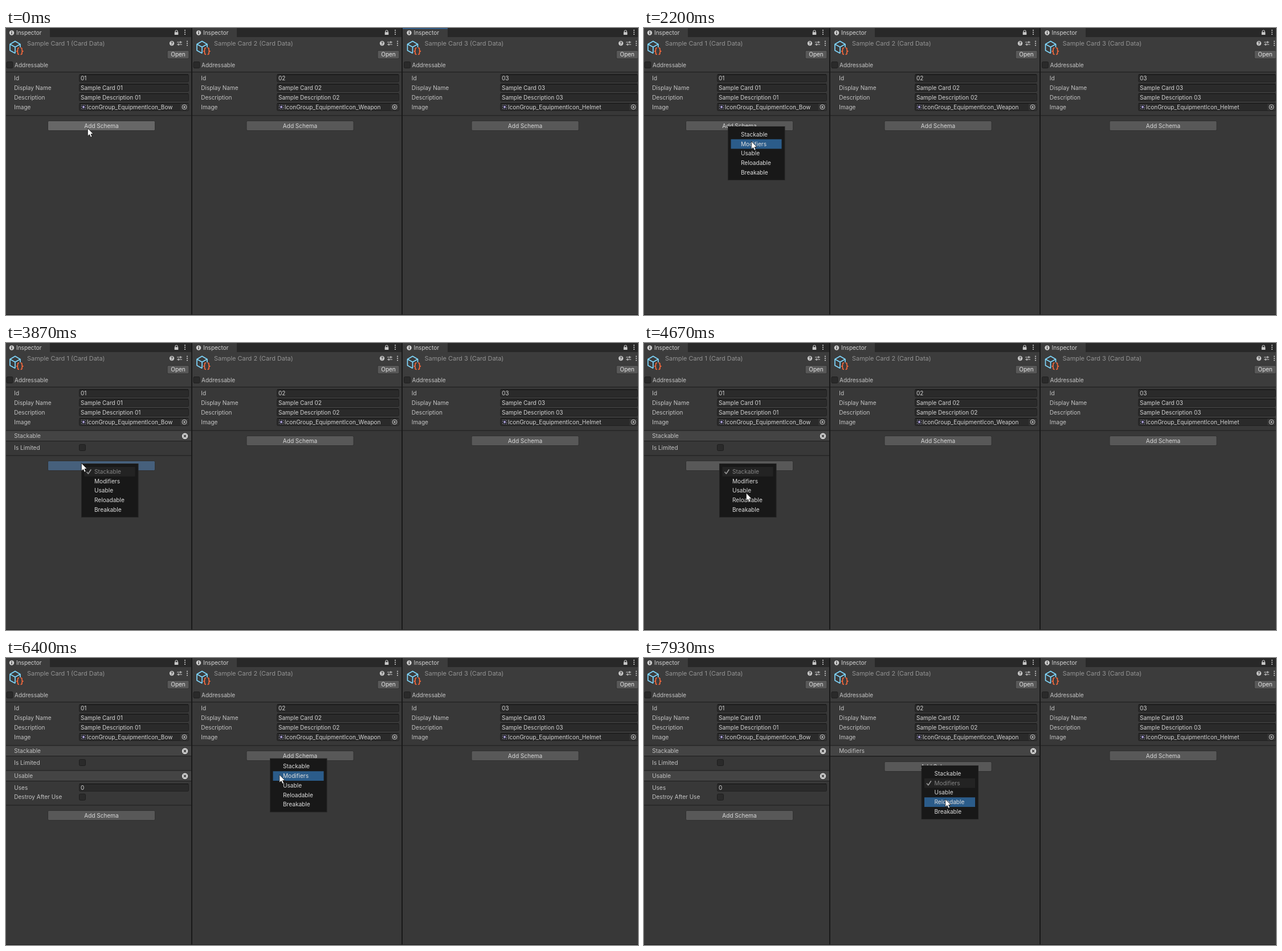
These frames come from a looping animation (1109 by 505 pixels, 8 s). An HTML page:

```html
<!DOCTYPE html>
<html lang="en">
<head>
<meta charset="utf-8">
<title>Card schemas</title>
<style>
html, body { margin: 0; width: 100%; height: 100%; overflow: hidden; background: #383838; }
svg { display: block; }
text { font-family: Inter, Roboto, sans-serif; white-space: pre; }
</style>
</head>
<body>
<svg id="stage" width="1109" height="505" viewBox="0 0 1109 505"></svg>
<script>
const LOOP = 8000, STEP = 1000 / 15;
const ITEMS = ['Stackable', 'Modifiers', 'Usable', 'Reloadable', 'Breakable'];
const ROW = 16.75, FONT = 10.03;

// x: content offset, left/right: panel edges, field: left edge of the inputs
const panels = [
  { n: 1, x: 0, left: 0, right: 325, tab: 77, field: 128, button: 73, image: 'Bow' },
  { n: 2, x: 328, left: 327, right: 694, tab: 405, field: 475, button: 421.5, image: 'Weapon' },
  { n: 3, x: 697.5, left: 696, right: 1113, tab: 775, field: 867, button: 816.5, image: 'Helmet' },
];

// Pointer moves: first step, last step, destination
const moves = [
  [9, 11, 147, 174], [13, 14, 147, 173], [26, 33, 188, 199], [36, 38, 187, 192],
  [39, 40, 186, 190], [45, 55, 132, 211], [58, 65, 178, 266], [69, 71, 180, 261],
  [75, 78, 198.5, 243.5], [78, 87, 463, 177], [90, 96, 479.5, 205], [105, 110, 487, 188],
  [113, 119, 528.5, 248],
];

const menus = [
  { from: 21, to: 43, x: 147, y: 173, panel: 1, pressed: 2 },
  { from: 58, to: 73, x: 132, y: 212, panel: 1, pressed: 2, checked: 0, blink: 70 },
  { from: 88, to: 104, x: 463, y: 176.5, panel: 2, pressed: 0, blink: 101 },
  { from: 112, to: 120, x: 486.5, y: 189, panel: 2, pressed: 2, checked: 1 },
];

const focusSpans = [[0, 21, 3], [43, 58, 1], [73, 89, 1], [104, 112, 2]];

const rect = (x, y, w, h, fill, more = '') =>
  `<rect x="${x}" y="${y}" width="${w}" height="${h}" fill="${fill}" ${more}/>`;
const box = (x, y, w, h, fill, line, r = 2) =>
  rect(x + .5, y + .5, w - 1, h - 1, fill, `stroke="${line}" rx="${r}"`);
const path = (d, stroke, w = 1, fill = 'none') =>
  `<path d="${d}" stroke="${stroke}" stroke-width="${w}" fill="${fill}" stroke-linejoin="round"/>`;
const dot = (x, y, r, fill, more = '') => `<circle cx="${x}" cy="${y}" r="${r}" fill="${fill}" ${more}/>`;
const at = (x, y, body) => `<g transform="translate(${x} ${y})">${body}</g>`;
// y is the middle of the capital letters
const text = (s, x, y, fill = '#c4c4c4', size = FONT, more = '') =>
  `<text x="${x}" y="${y + size * .364}" font-size="${size}" fill="${fill}" ${more}>${s}</text>`;

const dots = (x, y) => [-3.5, 0, 3.5].map(d => dot(x, y + d, 1.1, '#c8c8c8')).join('');
const info = (x, y) => dot(x, y, 4.2, '#d0d0d0') + rect(x - .7, y - 1, 1.4, 3.5, '#333') + dot(x, y - 2.3, .8, '#333');
const lock = (x, y) => rect(x - 3.3, y - .8, 6.6, 4.8, '#c8c8c8', 'rx=".5"') +
  path(`M${x - 2} ${y}v-2a2 2 0 0 1 4 0v2`, '#c8c8c8', 1.2);
const help = (x, y) => dot(x, y, 4.2, '#c8c8c8') + text('?', x, y, '#383838', 7.5, 'text-anchor="middle" font-weight="700"');
const sliders = (x, y) => path(`M${x - 4.5} ${y - 2}h9M${x - 4.5} ${y + 2}h9M${x + 1.7} ${y - 4}v4M${x - 1.7} ${y}v4`, '#c8c8c8', 1.2);
const cube = (x, y) => at(x, y,
  path('M10 22.5L1 17.5V6.5L10 1.2L19 6.5V12M1 6.5L10 11.5L19 6.5M10 11.5V22.5', '#7fd6fd', 1.7) +
  path('M17 13.2h-.8q-1.6 0-1.6 1.8v1.7q0 1.9-1.9 2.1q1.9 .2 1.9 2.1v1.7q0 1.8 1.6 1.8h.8' +
    'M19.6 13.2h.8q1.6 0 1.6 1.8v1.7q0 1.9 1.9 2.1q-1.9 .2-1.9 2.1v1.7q0 1.8-1.6 1.8h-.8', '#f4683c', 1.7));
const spriteIcon = (x, y) => rect(x - 4, y - 4, 8, 8, '#20202a') +
  path(`M${x - 3.5} ${y - 3.5}h7v7h-7z`, '#9a9aa4', '1" stroke-dasharray="1.6 1.9') + dot(x, y, 1.9, '#b4a8e0');
const target = (x, y) => dot(x, y, 4, 'none', 'stroke="#c4c4c4"') + dot(x, y, 1.6, '#c4c4c4');
const closeIcon = (x, y) => dot(x, y, 5.2, '#d4d4d4') +
  path(`M${x - 2.2} ${y - 2.2}l4.4 4.4m0-4.4l-4.4 4.4`, '#383838', 1.4);
const check = (x, y) => box(x, y - 6, 12, 12, '#2a2a2a', '#1e1e1e');

function input(p, y, value) {
  const w = p.right - 4 - p.field;
  return box(p.field, y - 7, w, 14, '#2a2a2a', '#212121') +
    rect(p.field + 1, y - 7, w - 2, 1, '#121212') + text(value, p.field + 3, y, '#d2d2d2');
}

function button(x, y, w, label, fill = '#585858') {
  return box(x, y - 9, w, 18, fill, '#303030') +
    text(label, x + w / 2, y, '#d8d8d8', FONT, 'text-anchor="middle"');
}

const line = (p, y) => rect(p.left, y - .5, p.right - p.left, 1, '#1c1c1c');

function header(p, focused) {
  const { x, left, right: r } = p, w = r - left;
  return rect(left, 0, w, 17, '#282828') + rect(left, 16, w, 61, '#3c3c3c') +
    rect(left, 0, p.tab - left, 17, '#3c3c3c') + (focused ? rect(left, 0, p.tab - left, 1.5, '#2d6299') : '') +
    info(x + 10, 8.5) + text('Inspector', x + 18, 8.5, '#d2d2d2') + lock(r - 26, 8) + dots(r - 11, 7.5) +
    cube(x + 6, 22) + text(`Sample Card ${p.n} (Card Data)`, x + 37, 27, '#939393', 10.95) +
    help(r - 34, 27) + sliders(r - 20.5, 27) + dots(r - 7, 27) +
    box(r - 42.5, 39, 39, 15.5, '#585858', '#303030') + text('Open', r - 23, 46.8, '#e4e4e4', FONT, 'text-anchor="middle"') +
    check(x + .5, 65) + text('Addressable', x + 15, 65) + line(p, 77.5);
}

function fields(p) {
  const label = p.x + 14.3, r = p.right;
  const rows = [['Id', '0' + p.n], ['Display Name', 'Sample Card 0' + p.n], ['Description', 'Sample Description 0' + p.n]];
  return rows.map(([name, value], i) => {
    const y = 88.5 + i * ROW;
    return text(name, label, y) + input(p, y, value);
  }).join('') +
    text('Image', label, 139) + input(p, 139, '') + spriteIcon(p.field + 8, 139) +
    text('IconGroup_EquipmentIcon_' + p.image, p.field + 13.8, 139, '#d2d2d2') +
    rect(r - 19, 133, 14, 12, '#343434') + target(r - 12, 139);
}

const schemaRows = { Stackable: [['Is Limited']], Usable: [['Uses', '0'], ['Destroy After Use']], Modifiers: [] };

function schemas(p, names, fill) {
  let y = 154, out = '';
  for (const name of names) {
    const rows = schemaRows[name];
    out += rect(p.left, y, p.right - p.left, 18.5, '#444') + line(p, y) + line(p, y + 18.5) +
      text(name, p.x + 14.3, y + 9.7) + closeIcon(p.right - 11, y + 9.7);
    rows.forEach(([label, value], i) => {
      const mid = y + 30 + i * ROW;
      out += text(label, p.x + 14.3, mid) + (value ? input(p, mid, value) : check(p.field, mid));
    });
    y += rows.length ? 28.2 + rows.length * ROW : 19;
    y = Math.floor(y);
  }
  return out + line(p, y) + button(p.button, y + 18, 189, 'Add Schema', fill);
}

function menu(m, f, [cx, cy]) {
  const hot = f === m.blink ? -1 : Math.floor((cy - m.y - 6) / ROW);
  return box(m.x, m.y, 100.5, 95, '#181818', '#242424', 0) + ITEMS.map((name, i) => {
    const y = m.y + 6 + i * ROW, mid = y + ROW / 2 - .2, off = i === m.checked;
    const fill = off ? '#232323' : i === hot ? '#2b5c8a' : '';
    return (fill ? rect(m.x + 5.5, y, 89, ROW, fill) : '') +
      (off ? path(`M${m.x + 9.5} ${mid + .5}l2.8 3.3l5-7.5`, '#9a9a9a', 1.6) : '') +
      text(name, m.x + 23, mid, off ? '#858585' : '#dedede', 10.1);
  }).join('');
}

function pointer(f) {
  let x = 143, y = 176;
  for (const [a, b, tx, ty] of moves) {
    if (f <= a) break;
    const k = Math.min(1, (f - a) / (b - a)), e = k * k * (3 - 2 * k);
    x += (tx - x) * e;
    y += (ty - y) * e;
  }
  return [x, y];
}

const arrow = ([x, y]) => at(x, y, path('M.3 .3V14.2L3.5 11.4L5.7 16.3L8.1 15.2L6 10.5H10.2Z', '#111', .8, '#fff'));

function buttonFill(n, f, open) {
  if (open && open.panel === n && f < open.from + open.pressed) return '#46607c';
  return n === 1 && f < 21 ? '#676767' : '#585858';
}

function draw(f) {
  const open = menus.find(m => f >= m.from && f < m.to);
  const focus = (focusSpans.find(([a, b]) => f >= a && f < b) || [])[2];
  const added = [
    [...(f >= 43 ? ['Stackable'] : []), ...(f >= 73 ? ['Usable'] : [])],
    f >= 104 ? ['Modifiers'] : [],
    [],
  ];
  const cursor = pointer(f);
  return rect(0, 0, 1109, 505, '#383838') +
    panels.map((p, i) => header(p, focus === p.n) + fields(p) + schemas(p, added[i], buttonFill(p.n, f, open))).join('') +
    rect(325, 0, 2, 505, '#191919') + rect(694, 0, 2, 505, '#191919') + rect(0, 504, 1109, 1, '#222') +
    (open ? menu(open, f, cursor) : '') + arrow(cursor);
}

const stage = document.getElementById('stage');
const start = performance.now();
let shown = -1;
function tick() {
  const t = (performance.now() - start) % LOOP;
  const f = Math.min(119, Math.floor((t + 4) / STEP));
  if (f !== shown) stage.innerHTML = draw(shown = f);
  requestAnimationFrame(tick);
}
tick();
</script>
</body>
</html>
```
